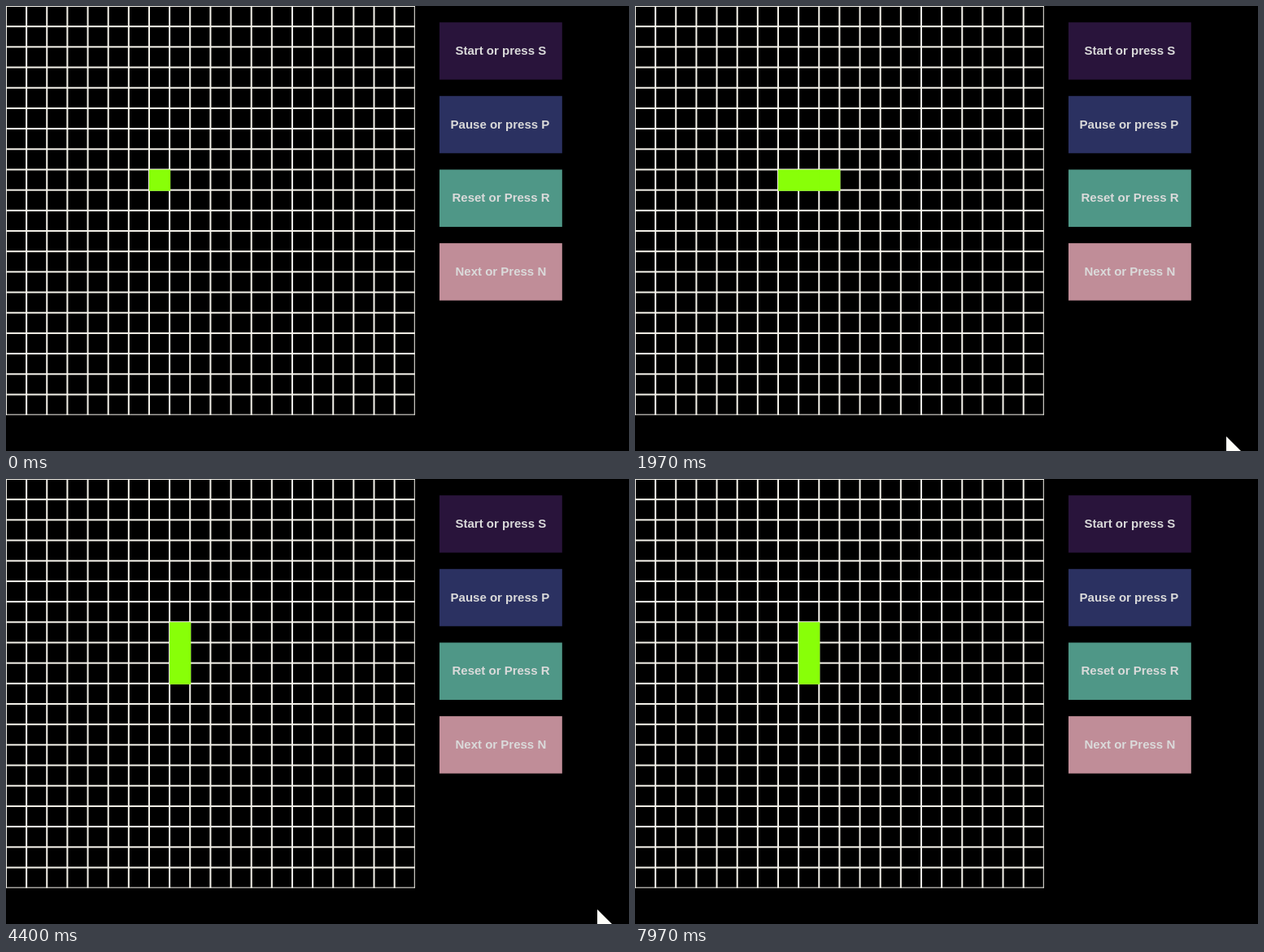
Write an HTML page that moves like this. It is 766 by 548 pixels and loops after 8000 ms.

```html
<!DOCTYPE html>
<html lang="en">
<head>
<meta charset="utf-8">
<title>Game of Life</title>
<style>
html, body { margin: 0; width: 100%; height: 100%; overflow: hidden; background: #000; }
svg { display: block; width: 766px; height: 548px; }
text { font: bold 15px "Liberation Sans", Arial, sans-serif; fill: #dadada; }
</style>
</head>
<body>
<svg id="stage" viewBox="0 0 766 548"></svg>
<script>
const LOOP = 8000, COUNT = 20, CELL = 25, SIZE = COUNT * CELL;
const FIRST_TURN = 1425, TURN = 455;
const LINE = '#f4f2ea';

function add(parent, tag, attrs, text = '') {
  const node = document.createElementNS('http://www.w3.org/2000/svg', tag);
  for (const key in attrs) node.setAttribute(key, attrs[key]);
  node.textContent = text;
  parent.append(node);
  return node;
}

// The game window is shown slightly enlarged.
const stage = document.getElementById('stage');
const board = add(stage, 'g', { transform: 'scale(1.0056 1.0073)' });
const rect = (x, y, width, height, fill) =>
  add(board, 'rect', { x, y, width, height, fill });

for (let i = 0; i <= COUNT; i++) {
  const from = Math.max(0, i * CELL - 1);
  const width = Math.min(SIZE, i * CELL + 1) - from;
  rect(0, from, SIZE, width, LINE);
  rect(from, 0, width, SIZE, LINE);
}

[
  ['#29143b', 552.5, 'Start or press S'],
  ['#2b3161', 546.6, 'Pause or press P'],
  ['#4f9787', 548.5, 'Reset or Press R'],
  ['#c08d98', 552.5, 'Next or Press N'],
].forEach(([fill, x, label], i) => {
  const y = 20 + 90 * i;
  rect(530, y, 150, 70, fill);
  add(stage, 'text', { x, y: y * 1.0073 + 40 }, label);
});

const cell = (col, row) =>
  rect(col * CELL, row * CELL, CELL + 1, CELL + 1, '#88ff08');
const left = cell(7, 8), middle = cell(8, 8), right = cell(9, 8);
const above = cell(8, 7), below = cell(8, 9);
const cursor = add(stage, 'path', { d: 'M0 0L30 30H0Z', fill: '#fffffa' });

// Pointer path: time, x, y
const path = [[700, 727, 548], [820, 727, 530], [4880, 727, 530], [5060, 731, 548]];

const show = (node, on) => node.setAttribute('visibility', on ? 'visible' : 'hidden');

function pointerAt(t) {
  const i = path.findIndex(p => p[0] > t);
  if (i < 1) return null;
  const [t0, x0, y0] = path[i - 1], [t1, x1, y1] = path[i];
  const k = (t - t0) / (t1 - t0);
  return [x0 + (x1 - x0) * k, y0 + (y1 - y0) * k];
}

function draw(t) {
  const upright = t >= FIRST_TURN && Math.floor((t - FIRST_TURN) / TURN) % 2 === 0;
  show(left, !upright);
  show(middle, t >= 250);
  show(right, !upright && t >= 500);
  show(above, upright);
  show(below, upright);
  const point = pointerAt(t);
  show(cursor, point);
  if (point) cursor.setAttribute('transform', `translate(${point})`);
}

const start = performance.now();
function tick() {
  draw((performance.now() - start) % LOOP);
  requestAnimationFrame(tick);
}
tick();
</script>
</body>
</html>
```
